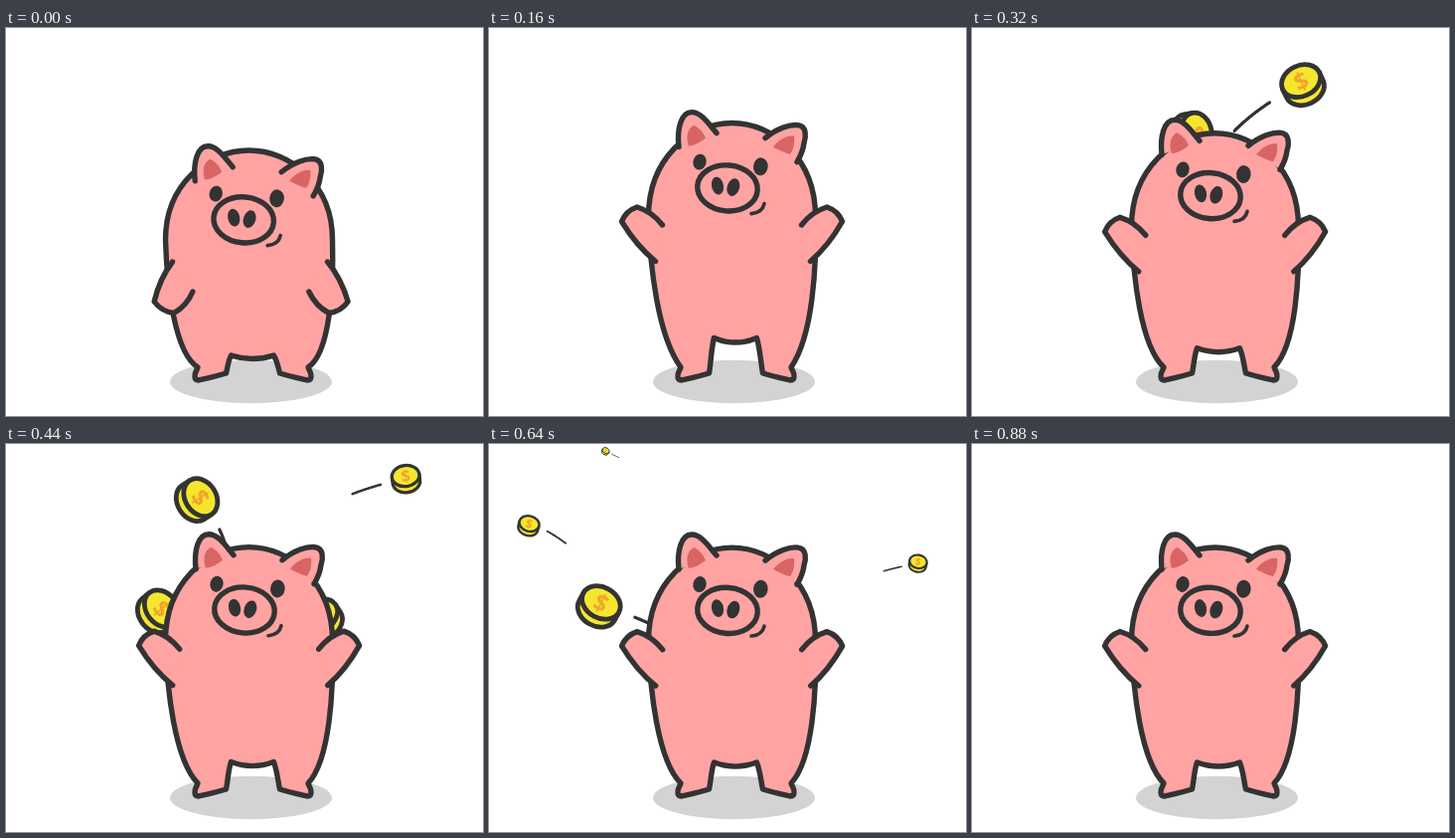
These frames come from a looping animation (480x390 px, 960 ms). An HTML page:

```html
<!DOCTYPE html>
<html lang="en">
<head>
<meta charset="utf-8">
<title>Happy pig</title>
<style>
  html, body { margin: 0; width: 100%; height: 100%; overflow: hidden; background: #fff; }
  svg { display: block; width: 480px; height: 390px; }
  .line { fill: none; stroke: #333; stroke-width: 5.4; stroke-linecap: round; stroke-linejoin: round; }
  .skin { fill: #ffa3a3; }
  .ink { fill: #333; }
  .inner { fill: #d96464; }
  .coin { fill: #f5e62d; stroke-width: 4.8; }
  .sign { font: bold 24px "Open Sans", Arial, sans-serif; fill: #f2a32e; text-anchor: middle; }
</style>
</head>
<body>
<svg viewBox="0 0 480 390">
  <ellipse cx="246.5" cy="355.5" rx="81.5" ry="21.7" fill="#d3d3d3"/>
  <g id="coins"></g>
  <path id="body" class="line skin"/>
  <path id="armL" class="line skin"/>
  <path id="armR" class="line skin"/>
  <g id="ears">
    <path class="line skin" d="M191 126C189 108 193 91 204 91C214 91 222 104 229 112"/>
    <path class="line skin" d="M278 117C290 107 303 103 311 104C320 105 319 116 317 122C316 130 313 136 310 141"/>
    <path class="inner" d="M206 104C199 108 198 117 201 125C207 124 213 121 218 117C215 110 211 106 206 104Z"/>
    <path class="inner" d="M286 126C292 118 300 114 307 115C308 122 306 129 303 133C298 132 292 129 286 126Z"/>
  </g>
  <g id="face">
    <ellipse class="ink" cx="212" cy="141" rx="6.6" ry="8" transform="rotate(14 212 141)"/>
    <ellipse class="ink" cx="273.3" cy="145.7" rx="7.3" ry="9" transform="rotate(6 273 146)"/>
    <ellipse class="line" cx="240" cy="167.3" rx="30.3" ry="23" transform="rotate(5 240 167)"/>
    <ellipse class="ink" cx="230" cy="165" rx="6" ry="9" transform="rotate(-12 230 165)"/>
    <ellipse class="ink" cx="246" cy="166.5" rx="6.2" ry="9" transform="rotate(18 246 166)"/>
    <path class="line" style="stroke-width:3.6" d="M264 193Q275 192 277 183"/>
  </g>
</svg>
<script>
const LOOP = 960, STEP = 40, LAST = 880, RISE = 160;
const $ = id => document.getElementById(id);
const mix = (a, b, k) => a + (b - a) * k;
const clamp = (v, lo = 0, hi = 1) => Math.min(hi, Math.max(lo, v));
const smooth = k => k * k * (3 - 2 * k);
const fmt = p => p[0].toFixed(2) + " " + p[1].toFixed(2);

// Points are [distance from the middle line, y]; the middle leans a little at the feet.
const place = ([w, y], side) => [244.5 + 4 * clamp((y - 200) / 140) + side * w, y];

// Half of the standing outline, from crown to crotch, as cubic segments.
const half = [
  [0, 104], [42, 104], [84, 140], [84, 198],
  [84, 248], [78, 318], [55.5, 341],
  [57, 345], [59, 347], [58.5, 350],
  [58.5, 354], [56, 354], [55, 354],
  [46, 352], [36, 350], [27, 347],
  [25, 338], [25, 330], [21.5, 320],
  [11, 324], [6, 324], [0, 324]
];
// Arm corners: outer shoulder, two hand corners, inner shoulder.
const armUp = [[70, 206.5], [95.5, 188.5], [111, 203], [78, 243]];
const armDown = [[78, 235], [97.5, 275], [78, 286.5], [58.5, 265]];

function bodyPath(squat, stretch) {
  const bend = ([w, y]) => [w, y + clamp((341 - y) / 18) *
    (stretch + squat * (9 + 10 * clamp((322 - y) / 218)))];
  const left = half.map(p => bend(place(p, -1)));
  const right = half.map(p => bend(place(p, 1))).reverse().slice(1);
  const [first, ...rest] = left.concat(right);
  return "M" + fmt(first) + "C" + rest.map(fmt).join(" ") + "Z";
}

function armPath(side, lift, stretch) {
  const swing = 14 * Math.sin(Math.PI * lift);
  const pts = armUp.map((u, i) => {
    const w = mix(armDown[i][0], u[0], lift), y = mix(armDown[i][1], u[1], lift);
    return place([w + (i % 3 ? swing : 0), y + stretch], side);
  });
  const mid = [0, 1].map(d => pts.reduce((sum, p) => sum + p[d] / 4, 0));
  let d = "M" + fmt(pts[0]);
  for (let i = 1; i < 4; i++) {
    // each edge bulges away from the middle of the arm
    const x = (pts[i - 1][0] + pts[i][0]) / 2, y = (pts[i - 1][1] + pts[i][1]) / 2;
    const far = 5 / Math.hypot(x - mid[0], y - mid[1]);
    d += "Q" + fmt([x + (x - mid[0]) * far, y + (y - mid[1]) * far]) + " " + fmt(pts[i]);
  }
  return d;
}

// Every coin flies along one curve, slowing down and shrinking to nothing.
const coins = [
  { start: 160, end: 590, path: [[245, 125], [312, 38], [460, 27]], turn: [-55, 5] },
  { start: 250, end: 680, path: [[221, 143], [240, 61], [110, 4]], turn: [95, 30] },
  { start: 380, end: 750, path: [[233, 250], [42, 45], [32, 90]], turn: [65, 5] },
  { start: 380, end: 735, path: [[305, 211], [310, 131], [474, 114]], turn: [-50, 20] },
  { start: 470, end: 870, path: [[190, 199], [147, 160], [8, 146]], turn: [65, 0] }
];
for (const c of coins) {
  c.el = document.createElementNS("http://www.w3.org/2000/svg", "g");
  c.el.innerHTML = '<path class="line"/><g>' +
    '<path class="line coin" d="M-20.3 -4V5A20.3 15.5 0 0 0 20.3 5V-4"/>' +
    '<ellipse class="line coin" cy="-4" rx="20.3" ry="15.5"/>' +
    '<text class="sign" y="4.8">$</text></g>';
  [c.trail, c.disc] = c.el.children;
  $("coins").append(c.el);
}

const onCurve = ([a, b, c], k) =>
  [0, 1].map(d => mix(mix(a[d], b[d], k), mix(b[d], c[d], k), k));

function drawCoin({ start, end, path, turn, el, trail, disc }, t) {
  const shown = t > start && t < end;
  el.style.display = shown ? "" : "none";
  if (!shown) return;
  const r = Math.min(22, (end - t) / 10);
  const k = 1 - ((end - t) / (end - start)) ** 1.5;
  const [x, y] = onCurve(path, k);
  disc.setAttribute("transform",
    `translate(${x} ${y}) rotate(${mix(turn[0], turn[1], k)}) scale(${r / 22})`);
  const pts = [];
  for (let j = k; j > 0; j -= 0.005) {
    const p = onCurve(path, j), gap = Math.hypot(p[0] - x, p[1] - y) / r;
    if (gap > 3.8) break;
    if (gap > 1.7) pts.push(fmt(p));
  }
  trail.setAttribute("d", pts.length > 1 ? "M" + pts.join("L") : "");
  trail.style.strokeWidth = clamp(r / 6, 0.8, 3.2);
}

// Jump up, then settle like a spring.
function bounce(t) {
  const late = t - RISE;
  return -8.5 * (late < 0 ? smooth(t / RISE)
    : Math.exp(-late / 103) * Math.cos(Math.PI * late / RISE));
}

function draw(time) {
  const t = Math.min(Math.floor((time % LOOP) / STEP) * STEP, LAST);
  const lift = smooth(clamp(t / RISE)), squat = 1 - lift, stretch = bounce(t);
  const shift = (id, drop) => $(id).setAttribute("transform",
    `translate(${-0.8 * squat} ${drop * squat + 0.75 * stretch})`);
  $("body").setAttribute("d", bodyPath(squat, stretch));
  $("armL").setAttribute("d", armPath(-1, lift, stretch));
  $("armR").setAttribute("d", armPath(1, lift, stretch));
  shift("ears", 27.8);
  shift("face", 25.6);
  for (const c of coins) drawCoin(c, t);
}

const begin = performance.now();
function tick() {
  draw(performance.now() - begin);
  requestAnimationFrame(tick);
}
tick();
</script>
</body>
</html>
```
